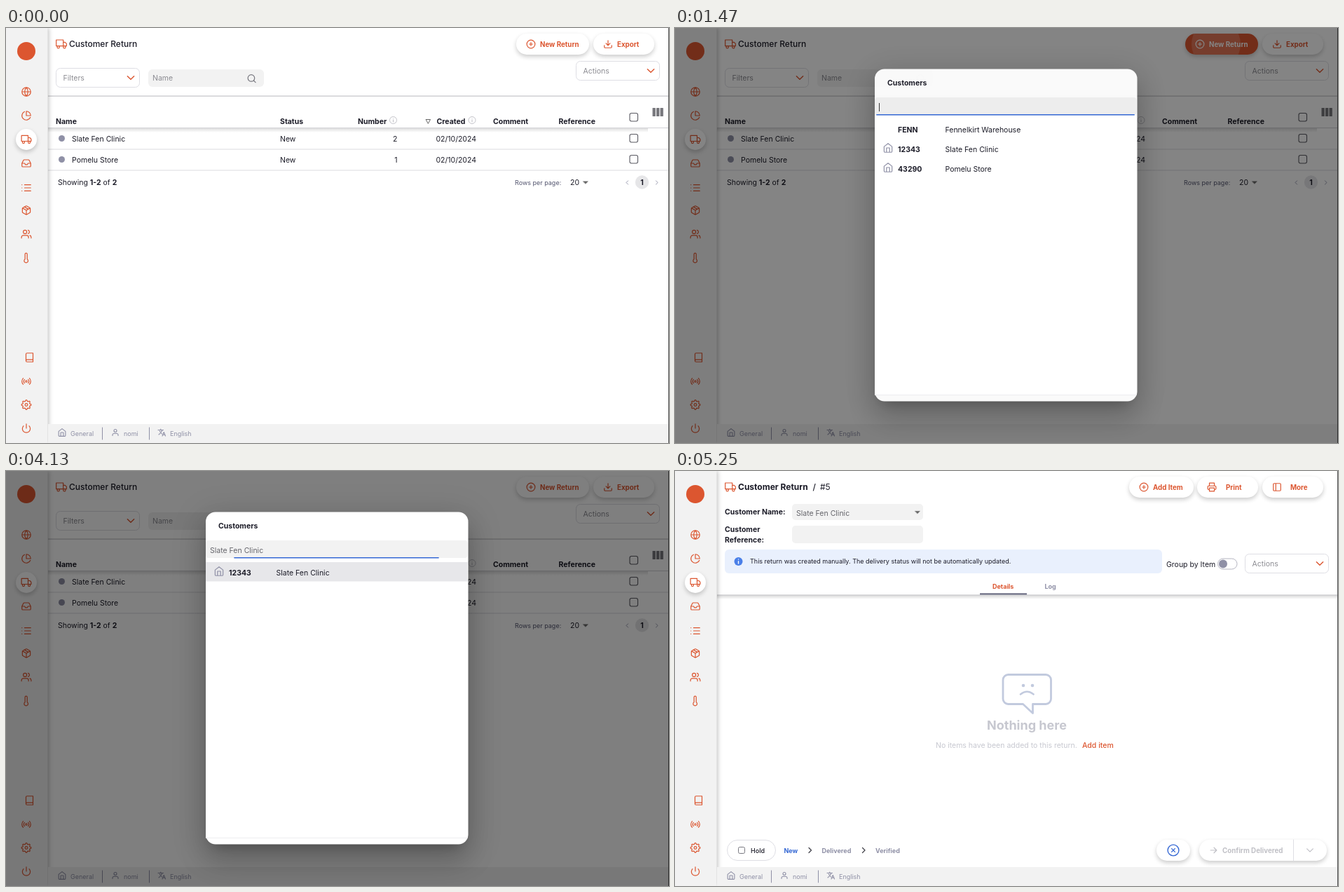
These frames come from a looping animation (946x592 px, 5.32 s). An HTML page:

```html
<!DOCTYPE html>
<html lang="en">
<head>
<meta charset="utf-8">
<title>Customer Return</title>
<style>
html, body { margin: 0; width: 100%; height: 100%; overflow: hidden; background: #fff; }
svg { display: block; width: 946px; height: 592px; }
text { font-family: Inter, "Open Sans", sans-serif; white-space: pre; }
</style>
</head>
<body>
<svg id="stage" viewBox="0 0 946 592"></svg>
<script>
const LOOP = 5320, STEP = 70;
const ORANGE = '#dc5630', BLUE = '#3568d4', INK = '#1c1c28', GREY = '#8f90a6', PALE = '#f2f2f2';
const CLINIC = 'Slate Fen Clinic', STORE = 'Pomelu Store';

// Outline icons on a 24 unit grid
const ring = (x, y, r) => `M${x - r} ${y}a${r} ${r} 0 1 0 ${2 * r} 0a${r} ${r} 0 1 0 ${-2 * r} 0z`;
const gear = () => {
  let d = '';
  for (let i = 0; i < 64; i++) {
    const a = i / 64 * Math.PI * 2, r = 9.6 + 1.4 * Math.tanh(2 * Math.cos(8 * a));
    d += `${i ? 'L' : 'M'}${(12 + r * Math.cos(a)).toFixed(2)} ${(12 + r * Math.sin(a)).toFixed(2)}`;
  }
  return d + 'z' + ring(12, 12, 3);
};
const ICONS = {
  truck: 'M1 3h15v13H1zM16 8h4l3 3v5h-7z' + ring(5.5, 18.5, 2.5) + ring(18.5, 18.5, 2.5),
  globe: ring(12, 12, 10) + 'M2 12h20M12 2a15.3 15.3 0 0 1 0 20a15.3 15.3 0 0 1 0-20',
  pie: 'M21.2 15.9A10 10 0 1 1 8 2.8M22 12A10 10 0 0 0 12 2v10z',
  inbox: 'M22 12h-6l-2 3h-4l-2-3H2M5.4 5.1L2 12v6a2 2 0 0 0 2 2h16a2 2 0 0 0 2-2v-6l-3.4-6.9A2 2 0 0 0 16.8 4H7.2a2 2 0 0 0-1.8 1.1z',
  list: 'M8 5h14M8 12h14M8 19h14M2 5h.01M2 12h.01M2 19h.01',
  box: 'M21 16V8a2 2 0 0 0-1-1.7l-7-4a2 2 0 0 0-2 0l-7 4A2 2 0 0 0 3 8v8a2 2 0 0 0 1 1.7l7 4a2 2 0 0 0 2 0l7-4a2 2 0 0 0 1-1.7zM3.3 7L12 12l8.7-5M12 22V12M7.5 4.2l9 5.2',
  users: 'M17 21v-2a4 4 0 0 0-4-4H5a4 4 0 0 0-4 4v2M23 21v-2a4 4 0 0 0-3-3.9M16 3.1a4 4 0 0 1 0 7.8' + ring(9, 7, 4),
  thermo: 'M14 14.8V3.5a2.5 2.5 0 0 0-5 0v11.3a4.5 4.5 0 1 0 5 0z',
  book: 'M4 19.5A2.5 2.5 0 0 1 6.5 17H20M6.5 2H20v20H6.5A2.5 2.5 0 0 1 4 19.5v-15A2.5 2.5 0 0 1 6.5 2z',
  radio: ring(12, 12, 2) + 'M16.2 7.8a6 6 0 0 1 0 8.5M7.8 16.2a6 6 0 0 1 0-8.5M19.1 4.9a10 10 0 0 1 0 14.2M4.9 19.1a10 10 0 0 1 0-14.2',
  gear: gear(),
  power: 'M18.4 6.6a9 9 0 1 1-12.8 0M12 2v10',
  home: 'M3 9l9-7 9 7v11a2 2 0 0 1-2 2H5a2 2 0 0 1-2-2zM8.5 22V12h7v10',
  user: 'M20 21v-2a4 4 0 0 0-4-4H8a4 4 0 0 0-4 4v2' + ring(12, 7, 4),
  lang: 'M1 5h15M8.5 2v3M13 5C11.5 10 8 14.500 3 18M5.500 8c1.500 3.500 4 6 6.500 8M13 22l4.500-11L22 22M14.500 18.500h6',
  plus: ring(12, 12, 10) + 'M12 8v8M8 12h8',
  download: 'M21 15v4a2 2 0 0 1-2 2H5a2 2 0 0 1-2-2v-4M7 10l5 5 5-5M12 15V3',
  print: 'M6 9V2h12v7M6 18H4a2 2 0 0 1-2-2v-5a2 2 0 0 1 2-2h16a2 2 0 0 1 2 2v5a2 2 0 0 1-2 2h-2M6 14h12v8H6z',
  panel: 'M5 3h14a2 2 0 0 1 2 2v14a2 2 0 0 1-2 2H5a2 2 0 0 1-2-2V5a2 2 0 0 1 2-2zM9 3v18',
  search: ring(11, 11, 8.5) + 'M22 22l-5-5',
  cross: ring(12, 12, 10) + 'M15 9l-6 6M9 9l6 6',
  arrow: 'M4 12h16M13 5l7 7-7 7',
  down: 'M4 8l8 8 8-8', left: 'M15 5l-7 7 7 7', right: 'M9 5l7 7-7 7'
};

// Drawing helpers
const text = (x, y, s, o = {}) =>
  `<text x="${x}" y="${y}" font-size="${o.size || 10.5}" font-weight="${o.w || 400}" fill="${o.fill || INK}" text-anchor="${o.at || 'start'}">${s}</text>`;
const bold = (x, y, s, o) => text(x, y, s, { w: 700, ...o });
const rect = (x, y, w, h, fill, r = 0, extra = '') =>
  `<rect x="${x}" y="${y}" width="${w}" height="${h}" rx="${r}" fill="${fill}" ${extra}/>`;
const outline = (x, y, w, h, r, color, sw = 1) => rect(x, y, w, h, 'none', r, `stroke="${color}" stroke-width="${sw}"`);
const disc = (x, y, r, fill, extra = '') => `<circle cx="${x}" cy="${y}" r="${r}" fill="${fill}" ${extra}/>`;
const path = (d, color, sw = 1, fill = 'none') =>
  `<path d="${d}" fill="${fill}" stroke="${color}" stroke-width="${sw}" stroke-linecap="round" stroke-linejoin="round"/>`;
const icon = (name, x, y, color = ORANGE, size = 15, sw = 1.2) =>
  `<g transform="translate(${x - size / 2} ${y - size / 2}) scale(${size / 24})">${path(ICONS[name], color, sw * 24 / size)}</g>`;
const shade = (x, y, w, h, r, blur, alpha) =>
  rect(x, y, w, h, '#000', r, `opacity="${alpha}" style="filter:blur(${blur}px)"`);
const pill = (x, y, w, fill = '#fff') =>
  shade(x, y + 3, w, 30, 15, 3, .2) + rect(x, y, w, 30, fill, 15);
const button = (x, w, name, label, hot) => {
  const color = hot ? '#fff' : ORANGE;
  return pill(x, 8, w, hot ? ORANGE : '#fff') + icon(name, x + 21, 23, color, 14) + bold(x + 34, 27, label, { size: 9.75, fill: color });
};
const checkbox = (y) => outline(890, y - 6, 11.5, 11.5, 2.5, '#5a5a62', 1.1);
const info = (x) => disc(x, 131.5, 5, 'none', 'stroke="#b4b4bc" stroke-width=".8"') + path(`M${x} 131v3M${x} 129h.01`, '#b4b4bc', .9);
const select = (x, y, label) => outline(x + .5, y + .5, 119, 27, 6, '#dedee4') +
  text(x + 10.5, y + 18, label, { fill: '#8c8c92' }) + icon('down', x + 107, y + 14, ORANGE, 14, 1.4);
const caretDown = (x, y) => path(`M${x - 3.5} ${y - 1.7}h7l-3.5 3.5z`, '#666', .4, '#666');

// Easing curve with control points (x1, 0) and (x2, 1)
function ease(p, x1, x2 = .2) {
  if (p <= 0) return 0;
  if (p >= 1) return 1;
  let lo = 0, hi = 1, u;
  for (let i = 0; i < 24; i++) {
    u = (lo + hi) / 2;
    if (3 * (1 - u) * (1 - u) * u * x1 + 3 * (1 - u) * u * u * x2 + u ** 3 < p) lo = u; else hi = u;
  }
  return 3 * (1 - u) * u * u + u ** 3;
}

function frame() {
  const nav = ['globe', 'pie', 'truck', 'inbox', 'list', 'box', 'users', 'thermo'];
  const ys = [91, 125, 159, 193, 228, 260, 294, 328];
  const foot = { size: 9, fill: GREY };
  return shade(0, 0, 61, 592, 0, 3, .25) + rect(0, 0, 59.5, 592, PALE) + disc(29, 33, 13, ORANGE) +
    shade(14, 147, 30, 30, 15, 3, .2) + disc(29, 159, 15, '#fff') +
    nav.map((n, i) => icon(n, 29, ys[i])).join('') +
    icon('book', 33.5, 470) + icon('radio', 29, 504) + icon('gear', 29, 537.5) + icon('power', 29, 571) +
    rect(60, 565, 885, 27, PALE) +
    icon('home', 80, 577, GREY, 13, 1.1) + text(92, 581.5, 'General', foot) +
    icon('user', 156, 577, GREY, 12, 1.1) + text(168, 581.5, 'nomi', foot) +
    icon('lang', 222.5, 577, GREY, 12, 1.1) + text(234, 581.5, 'English', foot) +
    path('M137.500 570v17M204.500 570v17', GREY) + rect(945, 0, 1, 592, '#555');
}

function ripple(t) {
  if (t >= 1330 && t < 1680)
    return disc(772, 23, 35, '#fff', `opacity="${.25 * (1680 - t) / 280}" clip-path="url(#press)"`);
  return t >= 4200 ? disc(780, 23, 35, ORANGE, 'opacity=".4" clip-path="url(#press)"') : '';
}

function listPage(t) {
  const row = (y, name, number) => disc(79.5, y, 4.5, GREY) + text(94, y + 4, name) + text(391, y + 4, 'New') +
    text(558.5, y + 4, number, { at: 'end' }) + text(671, y + 4, '02/10/2024', { at: 'end' }) + checkbox(y) +
    rect(60, y + 15, 885, 1, '#dcdce0');
  const heads = [[71, 'Name'], [391, 'Status'], [502, 'Number'], [614.5, 'Created'], [695, 'Comment'], [788.5, 'Reference']];
  return icon('truck', 79, 23, ORANGE, 16) + text(90, 27, 'Customer Return', { size: 12, w: 500 }) +
    button(728, 104, 'plus', 'New Return', t >= 1330 && t < 4130) + ripple(t) + button(838, 87, 'download', 'Export') +
    select(71, 57, 'Filters') + rect(203, 59, 165, 25, PALE, 6) + text(209, 74.5, 'Name', { fill: '#8c8c92' }) +
    icon('search', 350.5, 72, '#77777f', 13.5) + select(813, 47, 'Actions') +
    rect(60, 96.5, 885, 1.2, '#c4c4c8') + rect(60, 143, 856, 6, 'url(#under)') + rect(60, 142, 885, 1, '#d2d2d6') +
    heads.map(([x, s]) => bold(x, 137, s)).join('') + info(552.5) + info(665) +
    path('M599.500 130.500h6l-3 5.500z', '#555', .9) + checkbox(127.5) +
    [922.5, 928, 933.5].map(x => rect(x, 114, 4.3, 12, '#77777c', .6)).join('') +
    row(157.5, CLINIC, 2) + row(187.5, STORE, 1) +
    text(74, 224, 'Showing <tspan font-weight="700">1-2</tspan> of <tspan font-weight="700">2</tspan>') +
    text(726, 224, 'Rows per page:', { size: 9, fill: '#555770' }) + text(805, 224, '20') + caretDown(827, 220.5) +
    icon('left', 886.5, 220.5, GREY, 9, .9) + disc(907.5, 220, 9.7, '#e6e6e8') +
    bold(907.5, 224, '1', { at: 'middle' }) + icon('right', 928.5, 220.5, GREY, 9, .9);
}

function detailPage(t) {
  const small = { size: 9 }, look = t < 5250 ? -2.5 : 0, pale = '#c2cade';
  const shown = Math.min(1, Math.max(0, (t - 4690) / 350));
  return icon('truck', 79, 23, ORANGE, 16) + bold(90, 27, 'Customer Return', { size: 12 }) +
    text(196.5, 27, '/', { size: 12, w: 500 }) + text(207, 27, '#5', { size: 12 }) +
    button(648, 92, 'plus', 'Add Item') + button(745, 87, 'print', 'Print').replace('x="779"', 'x="786"').replace('x="779"', 'x="786"') +
    button(838, 87, 'panel', 'More').replace('x="872"', 'x="878"') +
    bold(71, 62, 'Customer Name:') + rect(167, 47, 187, 23, PALE, 5) + text(173, 63.5, CLINIC, { fill: '#66666c' }) + caretDown(346, 59) +
    bold(71, 87, 'Customer') + bold(71, 102, 'Reference:') + rect(167, 78, 187, 25, PALE, 5) +
    rect(71, 112, 624, 34, '#e9f0fd', 6) + disc(90.5, 129, 6, '#4a7fe8') + path('M90.500 128.700v3.300M90.500 126h.01', '#fff', 1.4) +
    text(107, 132, 'This return was created manually. The delivery status will not be automatically updated.', { size: 9 }) +
    text(701, 136.5, 'Group by Item') + outline(774.5, 125, 27.5, 15, 7.5, '#b4b4c0') + disc(782, 132.5, 6, GREY) + select(813, 118, 'Actions') +
    bold(453, 168, 'Details', { size: 9, fill: ORANGE }) + bold(527.5, 168, 'Log', { size: 9, fill: GREY }) +
    rect(60, 178, 885, 5, 'url(#under)') + rect(60, 176.5, 885, 1.2, '#bcbcc0') + rect(435, 174.5, 67, 1.8, '#555770') +
    `<g opacity="${shown}">` +
    path('M475.500 290.500h53.500a7.500 7.500 0 0 1 7.500 7.500v27a7.500 7.500 0 0 1-7.500 7.500h-18.500v13l-14-13h-21a7.500 7.500 0 0 1-7.500-7.500v-27a7.500 7.500 0 0 1 7.500-7.500z', pale, 2.8) +
    disc(497 + look, 306, 2.3, pale) + disc(510 + look, 306, 2.3, pale) + path('M493 318.500q9.500-7.500 18.500 0', pale, 2.6) + '</g>' +
    bold(445, 369, 'Nothing here', { size: 18, fill: '#c7c8d0' }) +
    text(372, 395, 'No items have been added to this return.', { fill: '#c7c8d0' }) + text(581, 395, 'Add item', { w: 500, fill: ORANGE }) +
    outline(74.5, 526.5, 69, 29, 14.5, '#dedee4') + outline(90.5, 536.5, 9, 9, 2, '#77777f') + text(108, 544.5, 'Hold', { size: 9, w: 500 }) +
    bold(155.5, 544.5, 'New', { ...small, fill: BLUE }) + icon('right', 192.5, 541, '#44444c', 12, 1.3) +
    bold(209.5, 544.5, 'Delivered', { ...small, fill: GREY }) + icon('right', 269, 541, '#44444c', 12, 1.3) +
    bold(286, 544.5, 'Verified', { ...small, fill: GREY }) +
    pill(687, 526, 48) + icon('cross', 711, 541, BLUE, 19, 1.4) +
    pill(748, 526, 182) + path('M882.500 526v30', '#dedee4') + icon('arrow', 768.5, 541, '#c0c0c6', 13, 1.2) +
    bold(781, 545, 'Confirm Delivered', { size: 9.75, fill: '#c0c0c6' }) + icon('down', 906, 541, '#c0c0c6', 13, 1.2);
}

// Typed states: start time, text, caret x
const TYPED = [[0, '', 291.5], [2100, 's', 297], [2240, 'sk', 302], [3080, 's', 297], [3290, 'sl', 299.5], [4130, CLINIC, 0]];
const OPTIONS = [['FENN', 'Fennelkirt Warehouse'], ['12343', CLINIC, 1], ['43290', STORE, 1]];

function dialog(t) {
  const fade = ease((t - 1300) / 225, .4) * (1 - ease((t - 4148) / 195, .4));
  const line = 373 * ease((t - 1300) / 200, 0) * (1 - ease((t - 4117) / 200, 0));
  const [, query, caret] = TYPED.findLast(s => s[0] <= t);
  const found = OPTIONS.filter(o => o[1].toLowerCase().includes(query.toLowerCase()));
  let out = rect(0, 0, 946, 592, '#000', 0, `opacity="${.5 * fade}"`) + `<g opacity="${fade}">` +
    shade(292, 76, 360, 460, 15, 7.5, .2) + shade(282, 79, 380, 480, 18, 19, .14) + shade(277, 59, 390, 490, 22, 23, .12) +
    rect(285, 58.5, 374.5, 474, '#fff', 14) + bold(303, 82, 'Customers') +
    rect(285, 99, 373.5, 25, PALE, 4) + text(291, 117, query, { fill: '#66666c' }) +
    (caret ? rect(caret - .5, 107, 1, 12, '#333') : '') + '</g>';
  if (t < 4340) {
    out += rect(285, 125, 373.5, 398.5, '#fff') + rect(285, 523, 373.5, 1, '#ededf0');
    if (!found.length) out += text(297, 148, 'No options', { fill: '#77777c' });
    found.forEach(([code, name, store], i) => {
      const y = 144 + 28 * i;
      if (t >= 4130) out += rect(285, 130, 373.5, 27.5, '#e7e7ea');
      out += (store ? icon('home', 304, y - 1, GREY, 15) : '') + bold(318, y + 4.5, code) + text(385.5, y + 4.5, name);
    });
  }
  return out + rect(471.5 - line / 2, 123, line, 1.5, BLUE);
}

const DEFS = `<defs><clipPath id="press">${rect(728, 8, 104, 30, '#000', 15)}</clipPath>
<linearGradient id="under" x2="0" y2="1"><stop stop-color="#000" stop-opacity=".13"/><stop offset="1" stop-opacity="0"/></linearGradient></defs>`;
const stage = document.getElementById('stage');
const start = performance.now();
let last = -1;

function tick() {
  const now = (performance.now() - start) % LOOP, t = Math.floor(now / STEP) * STEP;
  if (t !== last) {
    last = t;
    stage.innerHTML = DEFS + (t < 4410 ? listPage(t) : detailPage(t)) + frame() + (t >= 1330 && t < 4410 ? dialog(t) : '');
  }
  requestAnimationFrame(tick);
}
tick();
</script>
</body>
</html>
```
